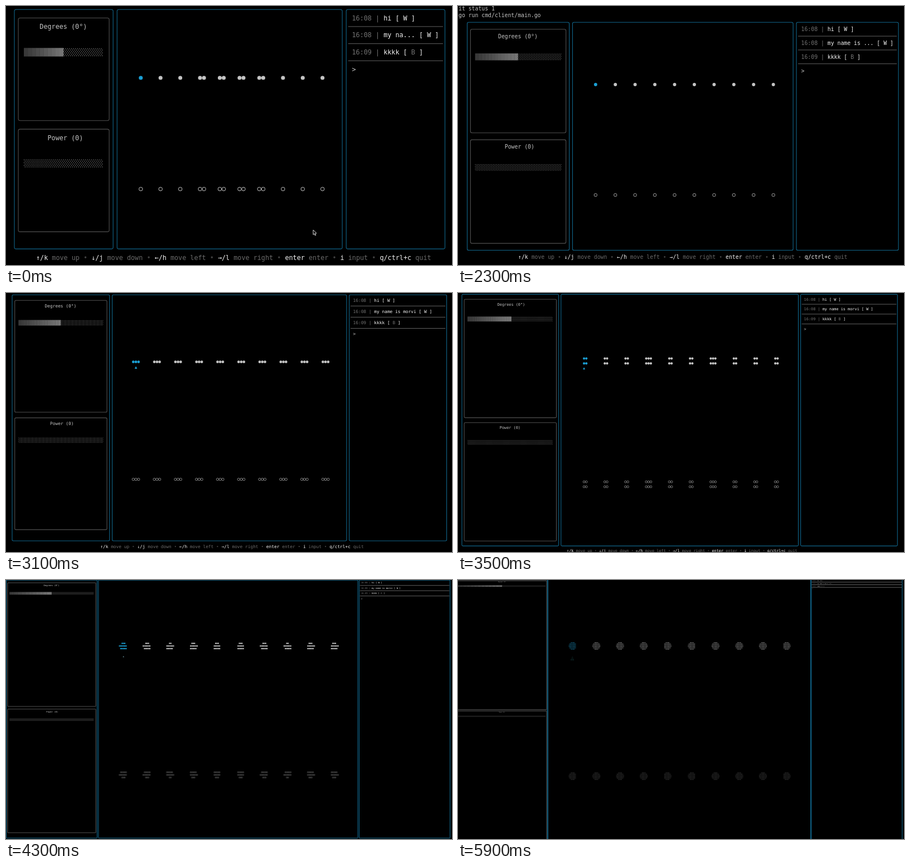
An HTML page with a canvas that plays this animation: 800 by 465 pixels, repeating every 6.2 s.

```html
<!DOCTYPE html>
<html lang="en">
<head>
<meta charset="utf-8">
<title>Terminal zoom</title>
<style>
html, body { margin: 0; width: 100%; height: 100%; overflow: hidden; background: #000; }
canvas { display: block; width: 800px; height: 465px; }
</style>
</head>
<body>
<canvas id="stage" width="800" height="465"></canvas>
<script>
const ctx = document.getElementById('stage').getContext('2d');
const LOOP = 6200, UNIT = 0.5905;
const BLUE = '#1a9fd4', EDGE = '#10658a', BOX = '#505050', GREY = '#727272', LIGHT = '#c4c4c4', WHITE = '#f2f2f2';

// Each zoom step: start time, font size, left edge of the panels
const steps = [
  { at: 0, font: 20, x: 15 },
  { at: 1600, font: 18, x: 19.5 },
  { at: 2100, font: 16, x: 16.5, shell: ['it status 1', 'go run cmd/client/main.go'] },
  { at: 2600, font: 14, x: 13 },
  { at: 2900, font: 13, x: 11 },
  { at: 3500, font: 11, x: 7 },
  { at: 3800, font: 9, x: 3, narrow: true },
  { at: 3900, font: 8, x: 2.5 },
  { at: 4300, font: 6, x: 0.5 },
  { at: 4500, font: 5, x: -0.5 },
  { at: 4800, font: 4, x: -1.5 },
  { at: 5200, font: 3, x: -2.8 }
];

const FOOTER = [['↑/k', 'move up'], ['↓/j', 'move down'], ['←/h', 'move left'], ['→/l', 'move right'],
  ['enter', 'enter'], ['i', 'input'], ['q/ctrl+c', 'quit']];
const CHAT = [['16:08', 'hi', 'W'], ['16:08', 'my name is morvi', 'W'], ['16:09', 'kkkk', 'B']];

// The terminal grid decides everything: cells are whole units, panels are whole cells
function layout({ font, x, shell, narrow }) {
  const cw = Math.round(0.602 * font) * UNIT, lh = Math.ceil(1.28 * font) * UNIT;
  const y = 0.42 * font - 2.2 + (shell ? shell.length * lh : 0);
  const right = narrow ? 664 : 798.5;
  const bottom = 475 - 1.75 * font - (narrow ? 36 : 0);
  const cols = Math.floor((right - x + cw / 2) / cw);
  const rows = Math.floor((bottom - y) / lh);
  const mid = 2 * rows + 1, side = Math.floor((cols - mid - 3) / 2);
  const midX = x + (side + 1) * cw, chatX = midX + (mid + 1) * cw;
  return { cw, lh, x, y, cols, rows, mid, side, midX, chatX, end: y + rows * lh };
}

// Writes coloured runs on the cell grid; y is the middle of the capitals
function write(x, y, cw, ...runs) {
  const size = cw / 0.602;
  ctx.font = `${size}px "DejaVu Sans Mono", monospace`;
  for (const [text, color] of runs) {
    ctx.fillStyle = color;
    ctx.fillText(text, x, y + size * 0.36);
    x += text.length * cw;
  }
}

function rect(x, y, w, h, color) {
  ctx.fillStyle = color;
  ctx.fillRect(x, y, w, h);
}

function frame(x, y, w, h, cw, color) {
  ctx.strokeStyle = color;
  ctx.lineWidth = 1.1;
  ctx.beginPath();
  ctx.roundRect(x, y, w, h, cw * 0.45);
  ctx.stroke();
}

function help(x, y, cw, keys) {
  const runs = [];
  keys.forEach(([key, label], i) => {
    if (i) runs.push([' • ', '#404040']);
    runs.push([key, WHITE], [' ' + label, '#6a6a6a']);
  });
  write(x, y, cw, ...runs);
}

function bar(x, y, cw, lh, cells, filled) {
  const top = y - lh / 2, start = x + filled * cw, end = x + cells * cw;
  for (let i = 0; i < filled; i++) {
    const v = Math.round(56 + 66 * i / filled);
    rect(x + i * cw, top, cw + 0.3, lh, `rgb(${v},${v},${v})`);
  }
  if (cw < 3.2) return rect(start, top, end - start, lh, '#1d1d1d');
  for (let r = 0; r < 6; r++) {
    for (let px = start + (r % 2 ? cw / 4 : 0); px < end; px += cw / 2) {
      rect(px, top + (r + 0.25) * lh / 6, cw * 0.16, lh / 12, '#909090');
    }
  }
}

function gauges({ cw, lh, x, y, rows, side }) {
  const cells = side - 5, barX = x + 2.4 * cw;
  const height = Math.floor((rows - 3) / 2) * lh;
  [['Degrees (0°)', Math.round(cells / 2)], ['Power (0)', 0]].forEach(([title, filled], i) => {
    const top = y + lh + i * (height + lh);
    frame(x + cw, top, (side - 2) * cw, height, cw, BOX);
    write(barX + Math.ceil((cells - title.length) / 2) * cw, top + lh, cw, [title, LIGHT]);
    bar(barX, top + 4 * lh, cw, lh, cells, filled);
  });
}

function dot(x, y, cw, color, hollow) {
  if (cw < 2) return rect(x - cw / 2, y - 0.5, cw, 1, color);
  ctx.beginPath();
  ctx.arc(x, y, cw * (hollow ? 0.46 : 0.5), 0, 7);
  ctx.fillStyle = ctx.strokeStyle = color;
  ctx.lineWidth = Math.max(0.4, cw * 0.14);
  hollow ? ctx.stroke() : ctx.fill();
}

// Balls are circles sampled on the grid, where a row is as tall as two columns
function balls({ cw, lh, y, rows, midX }) {
  const px = c => midX + (c + 1) * cw, py = r => y + (r + 1) * lh;
  const pitch = 2 * rows / 11, radius = rows / 34, tiny = cw < 2;

  function ball(cx, cy, color, hollow) {
    for (let r = Math.ceil(cy - radius / 2); r <= cy + radius / 2; r++) {
      const reach = Math.sqrt(radius ** 2 - (2 * (r - cy)) ** 2);
      for (let c = Math.ceil(cx - reach); c <= cx + reach; c++) dot(px(c), py(r), cw, color, hollow);
    }
  }

  for (let i = 1; i <= 10; i++) {
    const first = i === 1;
    ball(i * pitch, (rows - 1) / 4, tiny ? (first ? '#156a8c' : '#858585') : first ? BLUE : LIGHT, false);
    ball(i * pitch, 3 * (rows - 1) / 4, tiny ? '#383838' : cw < 4 ? '#999' : LIGHT, true);
  }

  if (rows < 40) return;
  const cx = Math.round(pitch), size = Math.max(1, Math.floor(rows / 66));
  for (let j = 0; j < size; j++) {
    for (let c = cx - j; c <= cx + j; c++) pointer(px(c), py(Math.floor(0.292 * rows) + j), cw);
  }
}

function pointer(x, y, cw) {
  const r = cw * 0.48;
  ctx.fillStyle = cw < 2 ? '#1c5a5c' : cw < 2.8 ? '#6f9aa6' : BLUE;
  ctx.beginPath();
  ctx.moveTo(x, y - r);
  ctx.lineTo(x + r, y + r);
  ctx.lineTo(x - r, y + r);
  ctx.fill();
}

function chat({ cw, lh, y, side, chatX }) {
  const room = side - 17, x = chatX + 1.45 * cw;
  CHAT.forEach(([time, text, tag], i) => {
    const line = y + (1 + 2 * i) * lh;
    const body = text.length > room ? text.slice(0, room - 3) + '...' : text;
    write(x, line, cw, [time + ' | ', GREY], [body + ' [ ', WHITE], [tag, tag === 'B' ? GREY : WHITE], [' ]', WHITE]);
    rect(chatX + cw / 2, line + lh - 0.5, (side - 1) * cw, 1, '#606060');
  });
  write(x, y + 7 * lh, cw, ['>', LIGHT]);
}

// Remains of the larger screen behind the shrunken one
function ghost() {
  rect(0, 437.5, 677, 1, '#242424');
  rect(668, 0, 9, 438, '#2b2b2b');
  rect(669, 0, 7, 438, '#141414');
  rect(668, 194.5, 9, 1, '#666');
  rect(668, 381, 9, 1, '#666');
  ctx.fillStyle = '#8c8c8c';
  ctx.beginPath();
  ctx.roundRect(670, 384, 6, 52, 3);
  ctx.fill();
  rect(677, 428, 123, 1, EDGE);
  help(268, 450.5, 9 * UNIT, FOOTER.filter(([key]) => /[↑↓]|enter|ctrl/.test(key)));
}

function mouse(x, y) {
  ctx.fillStyle = '#000';
  ctx.strokeStyle = '#d8d8d8';
  ctx.lineWidth = 1;
  ctx.beginPath();
  [[0, 0], [0, 8.5], [2, 6.8], [3.4, 10], [4.8, 9.3], [3.5, 6.3], [6, 6]]
    .forEach(([dx, dy]) => ctx.lineTo(x + dx, y + dy));
  ctx.closePath();
  ctx.fill();
  ctx.stroke();
}

function draw(step, showMouse) {
  const g = layout(step), { cw, lh, x, y, rows, cols } = g;
  rect(0, 0, 800, 465, '#000');
  for (const [left, cells] of [[x, g.side], [g.midX, g.mid], [g.chatX, g.side]]) {
    frame(left, y, cells * cw, rows * lh, cw, EDGE);
  }
  gauges(g);
  balls(g);
  chat(g);
  help(x + (Math.ceil((cols - 100) / 2) - 0.5) * cw, g.end + lh, cw, FOOTER);
  step.shell?.forEach((text, i) => write(1, 4.2 + i * lh, cw, [text, LIGHT]));
  if (step.narrow) ghost();
  if (showMouse) mouse(551, 402);
}

let shown = '';
function tick() {
  const t = performance.now() % LOOP;
  const index = steps.findLastIndex(s => s.at <= t);
  const showMouse = t < 100;
  const key = index + ':' + showMouse;
  if (key !== shown) {
    draw(steps[index], showMouse);
    shown = key;
  }
  requestAnimationFrame(tick);
}
tick();
</script>
</body>
</html>
```
